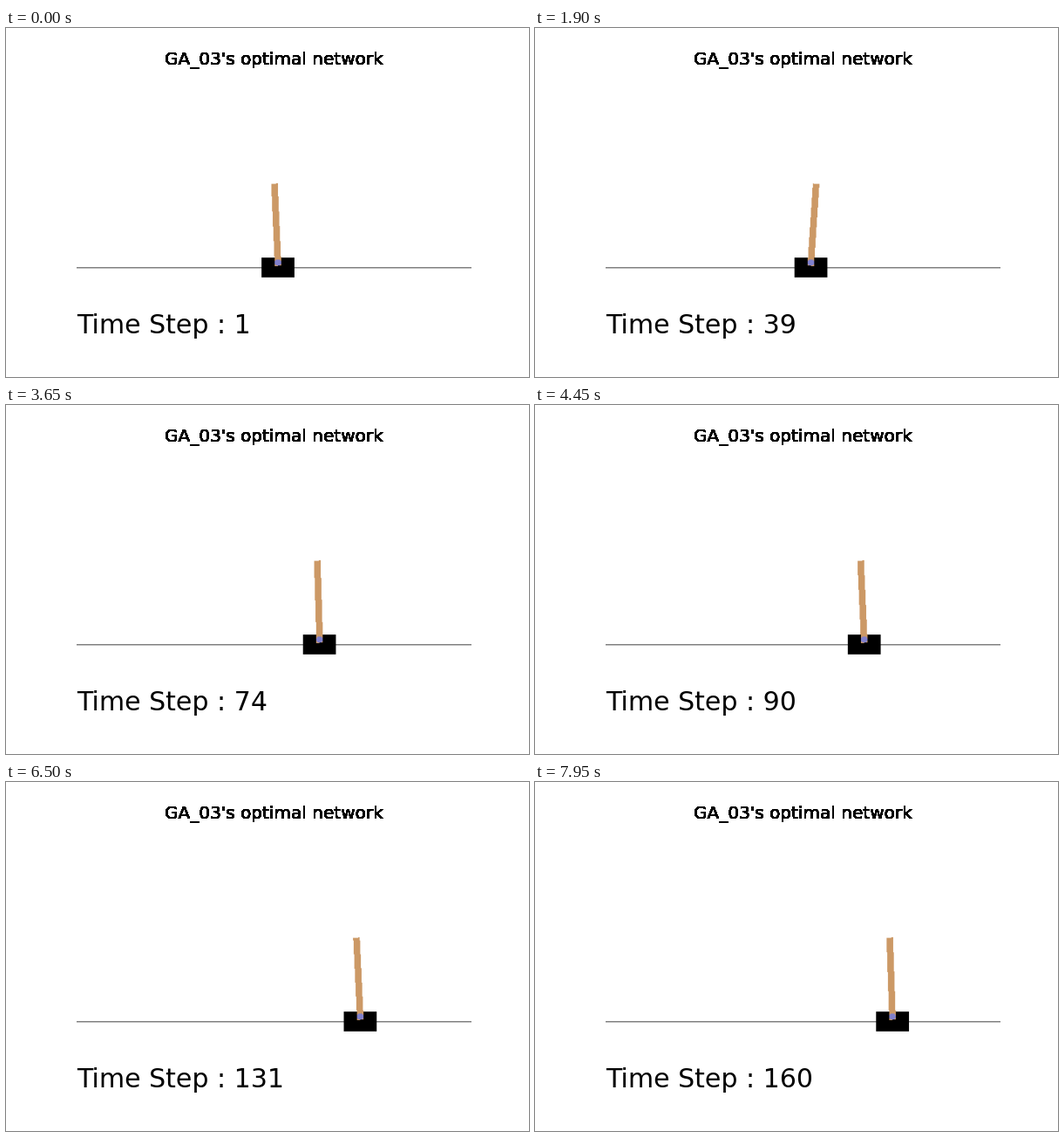
Recreate the animation shown at these times as a matplotlib script. Size 600 by 400 pixels, loop 8000 ms.

```python
import numpy as np
import matplotlib.pyplot as plt
from matplotlib.animation import FuncAnimation

W, H, DPI = 600, 400, 72
STEPS, INTERVAL = 160, 50
LEFT, BOTTOM, SCALE = 81, 50, 0.755      # where the simulator view sits on the stage
CART_W, CART_H, POLE_W, POLE_LEN = 50, 30, 10, 125
TRACK_Y = 300
AXLE_Y = TRACK_Y - CART_H / 4
SWING = POLE_LEN * SCALE * 2 / 3         # axle to the point the pole swings about

# (step, pole angle in radians): recover from a left lean, then brake
TILT = [(1, -.044), (10, .025), (24, .09), (39, .066),
        (59, .008), (72, -.026), (107, -.047), (131, -.047), (160, -.034)]
# (step, stage x of the swing point)
PIVOT = [(1, 309.2), (20, 310.3), (39, 320.7), (59, 341.2),
         (90, 374.8), (131, 403.4), (145, 407.2), (160, 407.9)]


def smooth(keys, t):
    """Cubic Hermite curve through (time, value) keys."""
    ts, vs = np.array(keys).T
    slopes = np.gradient(vs, ts)
    i = int(np.clip(np.searchsorted(ts, t) - 1, 0, len(ts) - 2))
    h = ts[i + 1] - ts[i]
    u = (t - ts[i]) / h
    ease = u * u * (3 - 2 * u)
    bend = u * (1 - u) * ((1 - u) * slopes[i] - u * slopes[i + 1])
    return vs[i] + ease * (vs[i + 1] - vs[i]) + h * bend


cols, rows = np.meshgrid(np.arange(W) + 0.5, np.arange(H) + 0.5)


def render(step):
    """Hard-edged view of the cart and pole at one time step."""
    tilt = smooth(TILT, step)
    cart_x = (smooth(PIVOT, step) - SWING * tilt - LEFT) / SCALE
    dx, dy = cols - cart_x, AXLE_Y - rows
    s, c = np.sin(tilt), np.cos(tilt)
    along, across = dx * s + dy * c, dx * c - dy * s
    r = POLE_W / 2

    img = np.full((H, W, 3), 255, np.uint8)
    img[TRACK_Y] = 0
    img[(abs(dx) < CART_W / 2) & (abs(rows - TRACK_Y) < CART_H / 2)] = 0
    img[(abs(across) < r) & (along > -r) & (along < POLE_LEN - r)] = (204, 153, 102)
    img[np.hypot(dx, dy) < r] = (128, 128, 204)
    return img


plt.rcParams["font.family"] = "DejaVu Sans"
fig = plt.figure(figsize=(W / DPI, H / DPI), dpi=DPI, facecolor="white")
ax = fig.add_axes([LEFT / W, BOTTOM / H, SCALE, SCALE])
ax.axis("off")
view = ax.imshow(render(1))

# stacked copies harden the title's edges
for _ in range(40):
    fig.text(307.5 / W, 358 / H, "GA_03's optimal network", size=20,
             ha="center", va="baseline")
label = fig.text(LEFT / W, BOTTOM / H, "", size=30, va="baseline")


def update(frame):
    step = frame + 1
    view.set_data(render(step))
    label.set_text(f"Time Step : {step}")
    return view, label


anim = FuncAnimation(fig, update, frames=STEPS, interval=INTERVAL,
                     repeat=True, repeat_delay=0, blit=False)
plt.show()
```
